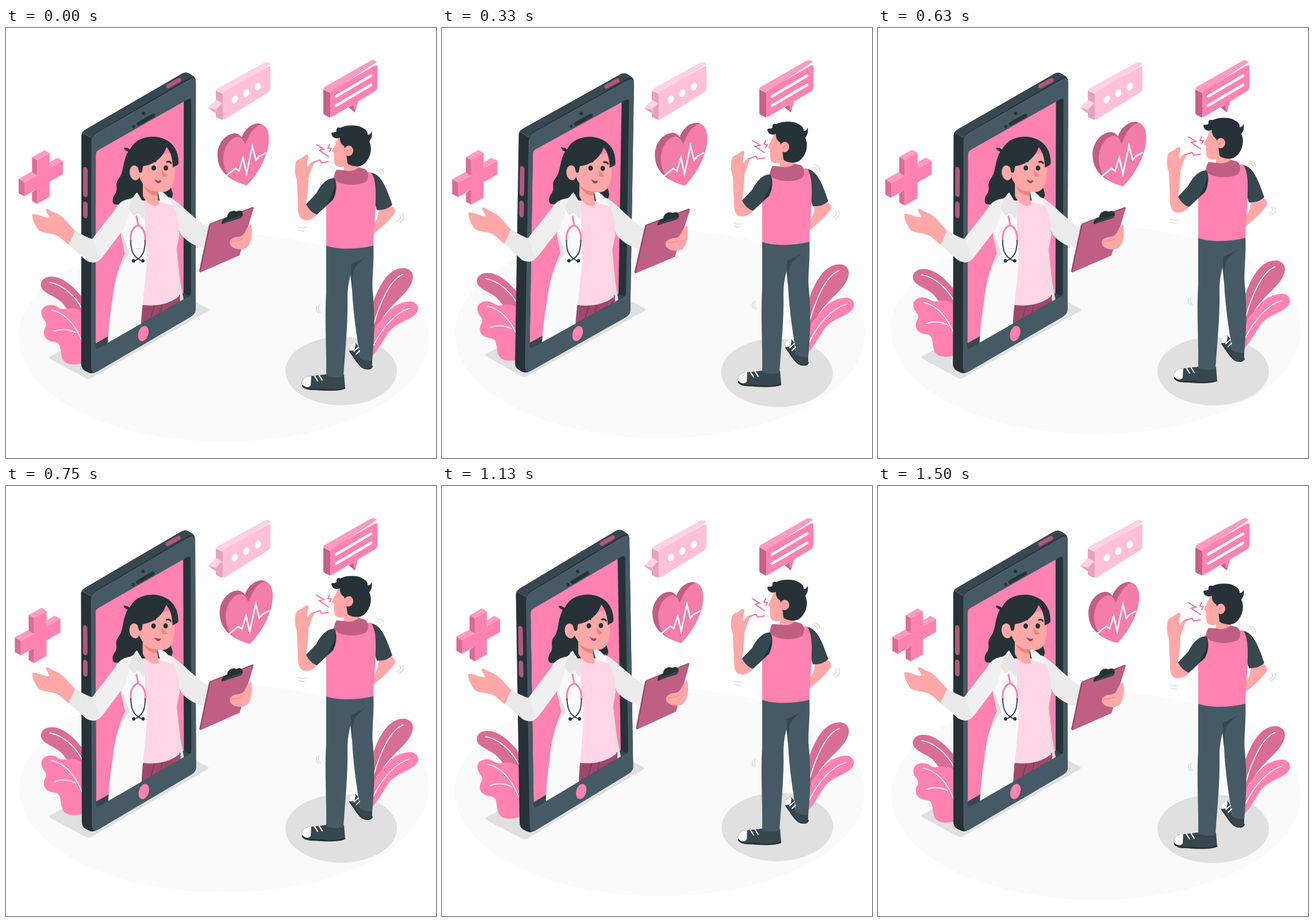
These frames come from a looping animation (748x748 px, 1540 ms). An HTML page with a canvas:

```html
<!DOCTYPE html>
<html lang="en">
<head>
<meta charset="utf-8">
<title>Online doctor</title>
<style>
html, body { margin: 0; width: 100%; height: 100%; overflow: hidden; background: #fff; }
canvas { display: block; width: 100vw; height: 100vh; }
</style>
</head>
<body>
<canvas id="stage" width="748" height="748"></canvas>
<script>
const ctx = document.getElementById('stage').getContext('2d');
const LOOP = 1540, STEP = 1000 / 24, CYCLE = 1500;
const PINK = '#ff82b0', ROSE = '#d96e95', LIGHT = '#ff9bc0', PLUM = '#bf5f83';
const INK = '#263238', SLATE = '#37474f', STEEL = '#455a64';
const SKIN = '#ffa8a7', BLUSH = '#ed847e', GREY = '#e0e0e0', WHITE = '#fff';

const paths = new Map();
function path(d) {
  if (!paths.has(d)) paths.set(d, new Path2D(d));
  return paths.get(d);
}
function fill(color, d) {
  ctx.fillStyle = color;
  ctx.fill(path(d));
}
function line(color, width, d) {
  ctx.strokeStyle = color;
  ctx.lineWidth = width;
  ctx.stroke(path(d));
}
function oval(color, x, y, rx, ry, turn = 0) {
  ctx.fillStyle = color;
  ctx.beginPath();
  ctx.ellipse(x, y, rx, ry, turn, 0, 2 * Math.PI);
  ctx.fill();
}
function group(draw, { x = 0, y = 0, dy = 0, turn = 0, scale = 1 }) {
  ctx.save();
  ctx.translate(x, y + dy);
  ctx.rotate(turn);
  ctx.scale(scale, scale);
  ctx.translate(-x, -y);
  draw();
  ctx.restore();
}

// Interpolates linearly through [position, value] stops.
function ramp(stops, at) {
  const i = Math.max(1, stops.findIndex(s => s[0] >= at));
  const [a, from] = stops[i - 1], [b, to] = stops[i];
  return from + (to - from) * (at - a) / (b - a);
}
const PACE = [[0, 21], [330, 345], [630, 692], [670, 748], [880, 970],
  [1130, 1155], [1330, 1330], [1500, 1490], [1540, 1500]];
const BOB = [[0, 0], [.5, -15], [1, 0]];
const SWAY = [[0, 0], [.25, 1], [.75, -1], [1, 0]];
const BEAT = [[0, 1], [.1, 1.1], [.3, 1], [.4, 1], [.5, 1.1], [.6, 1], [1, 1]];

function ground() { oval('#fafafa', 379, 539, 357, 181.5); }

function shadows() {
  fill(GREY, 'M76 572Q74 574 77 576L138 609Q143 613 149 609L352 492Q354 490 351 488L330 477 131 543Z');
  oval(GREY, 583, 596.5, 97, 59.5);
}

function plants() {
  fill(ROSE, 'M142 510V482C124 455 100 432 78 433C66 433 59 442 61 450C64 462 85 466 97 478C104 486 110 495 120 510Z');
  line(WHITE, 1.6, 'M76 443C100 447 122 468 134 492');
  fill(PINK, 'M142 580C118 590 100 587 97 572C94 560 96 550 87 547C75 546 64 541 66 528C67 521 72 519 69 512C64 505 60 500 62 492C65 482 80 479 90 486C100 493 104 487 116 488C126 489 131 493 142 500Z');
  line(WHITE, 1.6, 'M79 491C103 496 120 515 133 547M84 528C96 523 108 524 121 530');
  fill(ROSE, 'M636 560V485C645 460 660 418 692 418C706 419 711 431 706 442C700 462 672 478 655 505C648 520 643 545 640 560Z');
  line(WHITE, 1.6, 'M691 429C668 437 650 480 640 515');
  fill(PINK, 'M637 570C639 540 640 525 645 517C660 502 670 478 703 476C716 477 720 489 714 496C704 510 675 512 662 535C652 552 643 565 637 572Z');
  line(WHITE, 1.6, 'M702 488C680 494 655 520 639 553');
}

function phone() {
  fill(INK, 'M131 187Q131 181 138 177L305 80Q313 75 320 80L326 84Q330 87 330 94V490Q330 497 322 502L158 598Q149 603 143 599L137 596Q131 592 131 584Z');
  fill(SLATE, 'M132 183Q133 180 139 176L305 80Q313 75 320 80L327 85Q322 85 317 88L158 181Q151 185 149 192Z');
  fill(STEEL, 'M149 199Q149 188 158 183L317 91Q330 84 330 95V490Q330 497 322 502L160 597Q149 603 149 592Z');
  line('#66777f', .6, 'M149 592V199Q149 188 158 183L317 91Q323 87 327 88M149 191L133 182');
  line('#b0587c', 7.5, 'M282 101L301 90.5');
  fill('#b0587c', 'M134 247Q134 241 138 242 142 243 142 248V289Q142 295 138 294 134 293 134 288ZM134 307Q134 301 138 302 142 303 142 308V326Q142 332 138 331 134 330 134 325Z');
  oval(INK, 239, 148.5, 3, 3);
  oval(INK, 222, 171.5, 2.5, 3);
  line(INK, 6.5, 'M230 167L256 152');
  ctx.save();
  ctx.clip(path('M156 221Q156 215 161 212L316 124Q322 121 322 128V460Q322 465 318 467L161 557Q156 560 156 553Z'));
  fill(INK, 'M150 100H330V570H150Z');
  fill(PINK, 'M156 200L309 112V461L156 549Z');
  fill(SLATE, 'M156 549L309 461 322 467 156 563Z');
  ctx.restore();
  oval(PINK, 239, 531.5, 8.7, 13.5, .3);
}

function coat() {
  fill('#ebebeb', 'M283 294C300 300 325 332 358 352L345 383C330 380 315 372 305 360L292 335Z');
  fill(GREY, 'M285 300L302 358 297 385 303 440 309 472 302 482 290 400Z');
  fill('#9c4a6c', 'M235 478L303 464V482L230 524Z');
  line('#84395a', 2, 'M258 483Q255 493 250 510M271 482L269 494');
  fill('#ffd6e5', 'M236 300L265 300 288 304C300 325 304 345 299 360 293 385 298 435 301 467 282 482 256 485 233 481Z');
  fill('#fafafa', 'M225 292C207 300 199 325 200 360L207 392C194 420 188 445 185 475 180 505 178 530 177 555L235 520C236 480 245 435 245 390 241 360 243 335 240 306Z');
  fill(GREY, 'M199 350L215 393 207 402Q195 424 191 442 196 415 207 392Z');
  fill('#f0f0f0', 'M222 296C202 298 196 305 190 315L150 367 148 407C155 410 161 406 168 398L206 348Z');
  fill('#e9e9e9', 'M120 352Q137 363 152 368L162 402Q151 412 139 404L108 376Z');
}

function doctor() {
  ctx.save();
  ctx.clip(path('M0 0H748V465H321L161 557V465H0Z'));
  fill(INK, 'M214 212C202 230 206 250 196 262 188 272 196 280 190 288 184 296 184 306 190 307L250 308C280 306 290 300 290 288L282 260 230 200Z');
  coat();
  fill(SKIN, 'M238 266V292C244 305 258 314 266 307L262 278Z');
  fill(BLUSH, 'M239 274Q250 285 264 284L263 292Q246 290 239 274Z');
  fill('#e6e6e6', 'M228 286L239 304Q243 313 240 333L230 322 221 326 213 314C218 304 220 292 228 286Z');
  fill('#f5f5f5', 'M264 285L270 284C280 290 287 298 290 309L268 303Z');
  ctx.restore();
  fill(SKIN, 'M231 232L292 215C294 240 295 262 290 272 286 283 277 287 266 285 250 283 238 275 232 260Z');
  oval(SKIN, 224, 252, 9, 13, -.15);
  fill(INK, 'M216 216Q205 214 205 208 212 207 217 214 Z');
  fill(INK, 'M212 237C210 205 228 189 257 189 286 191 301 210 300 236 298 240 293 240 290 243 290 228 286 214 279 207 274 224 258 238 239 240 236 243 239 251 234 252 230 252 231 244 228 240 222 236 216 238 212 243Z');
  oval(INK, 257, 243.5, 4, 4.5);
  oval(INK, 278, 243.5, 4, 4.5);
  line(INK, 3, 'M251 234Q255 231 260 232M280 233Q284 231 287 235');
  fill(BLUSH, 'M270 246L281 257Q276 260 272 257Z');
  fill('#a64459', 'M258 263Q264 267 270 265 269 271 264 270 260 268 258 263Z');
  line(PINK, 3.2, 'M227 328L230 343C220 347 216 357 217 370M230 343C239 348 243 358 242 370');
  line(SLATE, 2, 'M217 370C217 388 222 398 234 404M242 370C242 388 238 398 226 404');
  oval(INK, 222, 405, 3, 3);
  oval(INK, 238, 405, 3, 3);
  fill(SKIN, 'M120 353C108 340 100 327 84 321 78 319 74 314 70 315 68 319 74 324 76 330 66 331 56 323 46 324 44 328 50 345 58 353 66 358 82 357 90 362 98 367 102 373 109 377Z');
}

function clipboard() {
  fill('#96466a', 'M353 343L355 340 429 311 431 312 406 395 338 425 336 423Z');
  fill(PLUM, 'M356 341L431 312 406 395 338 425Z');
  fill(INK, 'M375 341C374 335 379 331 385 329 384 322 393 315 401 319 407 316 412 318 412 325L409 330Z');
  fill(SLATE, 'M378 340Q380 335 386 334L408 326 411 328Z');
  fill(SKIN, 'M427 342C429 355 428 372 419 382 410 387 395 385 390 377 387 369 394 364 402 363 411 363 415 358 418 350 420 345 424 343 427 342Z');
  line(BLUSH, 1, 'M392 370Q402 372 412 367');
}

function cross() {
  fill(PINK, 'M57 230L78 218V244L101 231V254L78 267V293L57 305V279L35 292V268L57 256Z');
  fill(LIGHT, 'M48 225L69 213 78 218 57 230ZM25 262L47 250 57 256 35 268ZM78 234L91 226 101 231 78 244Z');
  fill(ROSE, 'M48 225L57 230V256L48 251ZM25 262L35 268V292L25 287ZM57 279V305L48 300V285Z');
}

function heart() {
  fill(PLUM, 'M416 273C396 267 366 255 366 221 366 200 382 184 396 184 402 184 405 188 408 191 412 178 424 167 437 167 449 169 455 180 454 196 453 225 432 258 416 273Z');
  fill('#f57da9', 'M416 273C400 268 377 262 376 228 376 208 388 190 402 190 409 191 412 199 414 204 418 190 428 172 441 169 450 170 455 182 454 196 453 225 432 258 416 273Z');
  line(WHITE, 2.5, 'M381 257L397 244 403 248 410 226 416 253 426 206 432 230 437 224 448 218');
}

function bubbles() {
  fill('#e6a3bd', 'M365 109L377 114V160L367 156Q365 155 365 152ZM351 139L365 148 366 140Z');
  fill('#ffd1e2', 'M365 109Q366 106 370 104L450 60Q456 57 460 63L377 115ZM351 139L366 125 376 131 365 142Z');
  fill('#ffc0d8', 'M377 118Q377 113 381 110L454 68Q460 64 460 70V103Q460 109 456 112L382 158Q377 162 377 156Z');
  for (let i = 0; i < 3; i++) oval(WHITE, 398 + 20 * i, 124.5 - 11.3 * i, 5, 7, .4);
  fill('#c46288', 'M552 107L564 113V156L554 151Q552 150 552 147ZM596 138L612 128 607 147Z');
  fill(LIGHT, 'M552 107Q552 103 557 101L634 57Q640 54 645 59L564 113Z');
  fill(PINK, 'M564 116Q564 111 568 108L640 66Q646 62 646 68V102Q646 107 642 110L612 128 607 145 603 133 568 154Q564 157 564 151Z');
  line(WHITE, 4.6, 'M574 119L635 83M574 135L635 99');
}

function legs() {
  fill(STEEL, 'M600 378L639 374C641 410 636 435 638 460 642 500 641 540 637 580 629 582 621 579 616 574 611 540 604 500 602 455L598 420Z');
  fill(SLATE, 'M607 548C599 550 596 556 598 563 606 572 612 585 620 590 630 596 637 592 637 586V579Q625 581 616 574L612 553Z');
  fill(WHITE, 'M607 548C599 550 596 556 598 562L606 561 608 552Z');
  line(INK, 2, 'M598 563C606 573 612 586 620 591 628 595 635 594 637 589');
  line(WHITE, 2, 'M605 563L613 556M609 568L615 562');
  fill(SLATE, 'M590 627L588 603Q572 610 557 603L530 606C519 606 513 613 515 622 519 631 530 630 545 631 562 632 580 632 590 627Z');
  fill(WHITE, 'M531 606C519 606 514 613 515 620 520 626 526 627 530 622Z');
  line(INK, 2.5, 'M516 623C522 631 535 628 550 629 565 631 578 631 589 627');
  line(WHITE, 2.2, 'M537 606L542 614M545 605L550 613');
  fill(STEEL, 'M557 375L625 375 607 405C600 425 594 445 594 470 595 515 590 560 587 606 577 610 566 609 557 605 558 560 554 510 557 460Z');
  fill(SLATE, 'M600 412Q612 407 628 398 610 410 606 420 602 432 602 455 600 435 600 412Z');
}

function man() {
  legs();
  fill(SKIN, 'M671 310C678 314 679 322 672 328 662 340 650 350 637 361L638 343Q648 334 648 318Z');
  fill(SLATE, 'M634 252C654 254 663 283 672 308 665 315 655 318 645 317L640 300Z');
  fill(PINK, 'M574 254L634 251C641 257 644 275 643 300 642 340 639 360 639 379 610 386 575 386 557 379V320C557 290 559 270 574 254Z');
  fill(SKIN, 'M522 306L542 324C535 333 525 337 517 334 510 332 508 322 508 315L506 265C501 252 502 238 506 231 512 227 517 226 520 222 525 219 528 223 525 229 524 234 522 240 525 242 529 235 533 230 537 234 533 240 531 248 526 262 526 280 524 293 522 306Z');
  fill(SLATE, 'M572 262C560 260 548 272 540 288L522 307C527 317 534 323 541 325L568 300C576 288 576 272 572 262Z');
  fill(INK, 'M572 264Q574 280 565 294L558 308 569 299Q576 282 572 264Z');
  fill(SKIN, 'M578 190C574 200 573 204 568 212 566 216 570 217 571 219 570 226 570 236 574 240 579 243 585 243 588 241V252Q602 260 614 252V232L592 193Z');
  fill(PLUM, 'M575 247C569 256 570 264 577 268 590 275 614 275 626 268 632 262 631 251 625 246L614 243Q602 252 588 248Z');
  fill(INK, 'M581 191C573 195 566 190 566 183 569 181 573 183 575 180 574 175 577 172 582 174 590 169 612 168 620 174 628 178 630 183 629 186 632 187 635 184 636 180 638 190 634 195 632 198 639 212 632 232 620 239 612 243 600 241 594 236L592 219 588 206C583 203 580 197 581 191Z');
  oval(SKIN, 596, 214, 8, 9, .2);
  line(BLUSH, 1.2, 'M593 217Q594 211 600 211');
  line('#f2709f', 2, 'M540 203L553 211 545 213 561 224M563 203L560 209 566 210 563 215M535 234L546 230 549 235 561 233');
  line(GREY, 1.8, 'M508 346Q515 350 523 347M509 351Q514 355 519 353M685 325Q689 332 680 337M690 325Q695 333 684 339M644 249Q652 248 653 257M646 245Q657 245 657 255M545 482Q541 489 547 495M541 484Q537 491 544 496');
}

function render(now) {
  const tick = Math.floor((now % LOOP + 5) / STEP);
  const phase = ramp(PACE, Math.min(tick * STEP, LOOP)) / CYCLE;
  const float = { dy: ramp(BOB, phase) };
  const turn = ramp(SWAY, phase) * Math.PI / 180;

  ctx.fillStyle = WHITE;
  ctx.fillRect(0, 0, 748, 748);
  ctx.lineCap = 'round';
  ctx.lineJoin = 'miter';
  group(ground, float);
  group(shadows, { x: 378, y: 573, turn });
  group(plants, float);
  group(() => { phone(); doctor(); clipboard(); }, { x: 237, y: 340, turn });
  group(() => { cross(); heart(); }, { x: 240, y: 236, scale: ramp(BEAT, phase) });
  bubbles();
  group(man, float);
}

let start;
function loop(now) {
  start ??= now;
  render(now - start);
  requestAnimationFrame(loop);
}
render(0);
requestAnimationFrame(loop);
</script>
</body>
</html>
```
